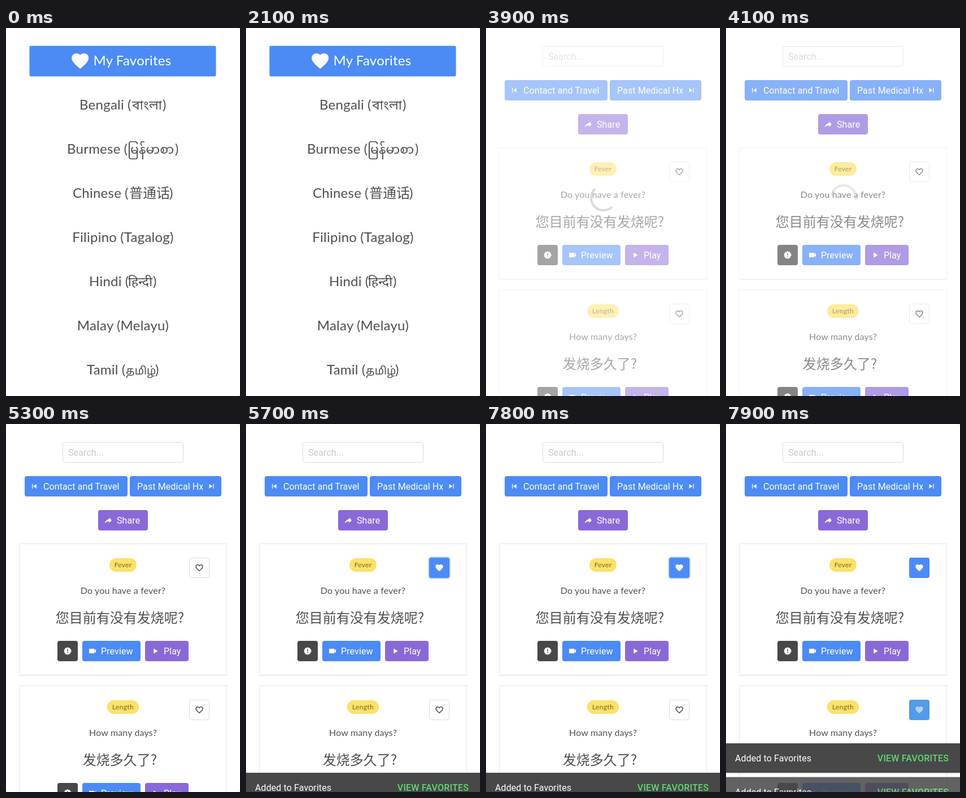
These frames come from a looping animation (414x650 px, 8 s). An HTML page:

```html
<!DOCTYPE html>
<html lang="zh-CN">
<head>
<meta charset="utf-8">
<title>Phrasebook</title>
<style>
html, body { margin: 0; width: 100%; height: 100%; overflow: hidden; background: #fff; }
svg { display: block; width: 414px; height: 650px; }
text { fill: #4f4f4f; white-space: pre; }
.list { font: 400 24px Lato, 'Noto Sans CJK SC', 'Noto Sans CJK', sans-serif; letter-spacing: .25px; word-spacing: -.4px; }
.title { font: 700 32px Lato, sans-serif; letter-spacing: .6px; fill: #444; }
.script { font-family: 'Noto Sans Bengali', 'Noto Sans Myanmar', 'Noto Sans Devanagari', 'Noto Sans Tamil', 'Noto Sans CJK SC', 'Noto Sans CJK', 'Noto Sans', sans-serif; }
.ask { font: 400 16px Lato, sans-serif; letter-spacing: .15px; }
.tag { font: 400 12px Lato, sans-serif; letter-spacing: .3px; }
.han { font: 400 24px 'Noto Sans CJK SC', 'Noto Sans CJK', sans-serif; }
.ui { font: 400 16px Roboto, sans-serif; letter-spacing: .1px; }
.act { font: 500 16px Roboto, sans-serif; letter-spacing: .2px; }
.mid { text-anchor: middle; }
.end { text-anchor: end; }
</style>
</head>
<body>
<svg id="stage" viewBox="0 0 414 650" xmlns="http://www.w3.org/2000/svg"></svg>
<script>
const LOOP = 8000, BLUE = '#4c8bf5', PURPLE = '#8969d8', DARK = '#484848';
const CATEGORIES = 2400, PHRASES = 3900, FADE = 4050, TAP1 = 5330, TAP2 = 7830;
const SNACK_H = 52, SNACK_Y = 616;

const HEART = 'M12 21.35l-1.45-1.32C5.4 15.36 2 12.27 2 8.5 2 5.41 4.42 3 7.5 3c1.74 0 3.41.81 4.5 2.08C13.09 3.81 14.76 3 16.5 3 19.58 3 22 5.41 22 8.5c0 3.77-3.4 6.86-8.55 11.53z';
const ICONS = {
  heart: HEART,
  outline: HEART + 'M12 18.65C7.14 14.24 4 11.39 4 8.5 4 6.5 5.5 5 7.5 5c1.54 0 3.04 1 3.57 2.36h1.86C13.46 6 14.96 5 16.5 5c2 0 3.5 1.5 3.5 3.5 0 2.89-3.14 5.74-8 10.15z',
  prev: 'M6 18V6h2v12zM9.5 12L18 6v12z',
  next: 'M16 18V6h2v12zM6 18V6l8.5 6z',
  share: 'M21 12l-7-7v4C7 10 4 15 3 20c2.5-3.5 6-5.1 11-5.1V19z',
  video: 'M17 10.5V7a1 1 0 0 0-1-1H4a1 1 0 0 0-1 1v10a1 1 0 0 0 1 1h12a1 1 0 0 0 1-1v-3.5l4 4v-11z',
  play: 'M8 5.1v14l11-7z'
};

const text = (x, y, s, cls, extra = '') => `<text x="${x}" y="${y}" class="${cls}" ${extra}>${s}</text>`;
const white = 'style="fill:#fff"';
const box = (x, y, w, h, r, fill, extra = '') =>
  `<rect x="${x}" y="${y}" width="${w}" height="${h}" rx="${r}" fill="${fill}" ${extra}/>`;
const frame = (x, y, w, h, r, stroke) =>
  box(x + .5, y + .5, w - 1, h - 1, r, '#fff', `stroke="${stroke}"`);
const icon = (name, cx, cy, size = 16, fill = '#fff') =>
  `<path d="${ICONS[name]}" fill="${fill}" fill-rule="evenodd" transform="translate(${cx - size / 2} ${cy - size / 2}) scale(${size / 24})"/>`;
const button = (x, y, w, fill, name, ix, label, tx) =>
  box(x, y, w, 36, 4, fill) + icon(name, ix, y + 18) + text(tx, y + 24, label, 'ui', white);
const group = (id, body) => `<g id="${id}">${body}</g>`;

const favorites = y => box(41.5, y - .5, 330, 54, 3, BLUE) +
  icon('heart', 131.2, y + 26.2, 36) + text(154.5, y + 34, 'My Favorites', 'list', white);

// Latin part, its x, native name, its x and size, x of the closing bracket
const languages = [
  ['Bengali (', 130, 'বাংলা', 223, 23, 277],
  ['Burmese (', 108, 'မြန်မာစာ', 215, 22, 299],
  ['Chinese (', 118, '普通话', 218, 24, 289],
  ['Filipino (Tagalog)'],
  ['Hindi (', 147, 'हिन्दी', 216, 23, 260],
  ['Malay (Melayu)'],
  ['Tamil (', 143, 'தமிழ்', 212, 19, 264]
];
const languageRow = ([name, x, native, nx, size, close], i) => {
  const y = 144 + i * 78;
  if (!native) return text(207, y, name, 'list mid');
  return text(x, y, name, 'list') +
    text(nx, y, native, 'script', `style="font-size:${size}px"`) + text(close, y, ')', 'list');
};

const categories = ['All Categories', 'Introduction', 'Contact and Travel', 'Symptoms', 'Past Medical Hx', 'Physical Exam'];

function card(n, dy, tag, tagX, tagW, question, han) {
  return `<g transform="translate(0 ${dy})">` +
    box(23, 212, 368, 233, 0, '#000', 'opacity=".07"') + frame(23, 211, 368, 233, 0, '#e6e6e6') +
    box(tagX, 237, tagW, 24, 12, '#fde168') +
    text(207, 253, tag, 'tag mid', 'style="fill:#6f632e"') +
    group('off' + n, frame(324, 236, 36, 36, 4, '#dbdbdb') + icon('outline', 342, 254, 16, '#363636')) +
    group('on' + n,
      box(323, 235, 38, 38, 5, 'none', `id="ring${n}" stroke="${BLUE}" stroke-width="2" stroke-opacity=".3"`) +
      box(324, 236, 36, 36, 4, BLUE, `id="fill${n}"`) +
      `<g id="mark${n}">${icon('heart', 342, 254)}</g>`) +
    text(207, 300, question, 'ask mid') +
    text(201.5, 351, han, 'han mid') +
    box(91, 383, 36, 36, 4, DARK) +
    '<circle cx="109" cy="401" r="6" fill="#fff"/><circle cx="109" cy="401" r="6" fill="none" stroke="#fff" stroke-width="1.4" stroke-dasharray="1.9 1.87"/>' +
    box(108.3, 397.3, 1.4, 4.4, 0, DARK) + box(108.3, 403, 1.4, 1.5, 0, DARK) +
    button(135, 383, 103, BLUE, 'video', 153, 'Preview', 168) +
    button(246, 383, 77, PURPLE, 'play', 264, 'Play', 279) + '</g>';
}

const snack = id => group(id,
  box(0, 1, 414, SNACK_H + 1, 0, '#000', 'opacity=".1"') + box(0, 0, 414, SNACK_H, 0, '#484848') +
  text(16, 32, 'Added to Favorites', 'ui', white) +
  text(394, 32, 'VIEW FAVORITES', 'act end', 'style="fill:#5fd774"'));

const arc = '<path d="M15.56 15.56A22 22 0 0 1 -15.56 -15.56" fill="none" stroke="#dbdbdb" stroke-width="4"/>';

document.getElementById('stage').innerHTML =
  box(0, 0, 414, 650, 0, '#aaa') + box(0, 0, 414, 650, 2, '#fff') +
  group('languages', favorites(32) + languages.map(languageRow).join('')) +
  group('categories', text(207, 60, 'Chinese', 'title mid') + favorites(92) +
    categories.map((s, i) => text(207, 204 + i * 78, s, 'list mid')).join('')) +
  group('phrases',
    frame(100, 32, 214, 36, 3, '#dbdbdb') +
    text(110, 56, 'Search...', 'ui', 'style="fill:#c8c8c8"') +
    button(33, 92, 182, BLUE, 'prev', 50, 'Contact and Travel', 66) +
    button(219, 92, 162, BLUE, 'next', 363.5, 'Past Medical Hx', 232) +
    button(163, 152, 88, PURPLE, 'share', 181, 'Share', 196) +
    card(1, 0, 'Fever', 183, 48, 'Do you have a fever?', '您目前有没有发烧呢?') +
    card(2, 251, 'Length', 179, 56, 'How many days?', '发烧多久了?')) +
  group('loading', box(0, 0, 414, 650, 0, '#fff', 'opacity=".5"') + group('spinner', arc)) +
  snack('snack1') + snack('snack2');

const $ = id => document.getElementById(id);
const clamp = v => Math.max(0, Math.min(1, v));
const show = (id, on) => $(id).setAttribute('display', on ? 'inline' : 'none');

function heart(n, t, tap, blur) {
  const on = t >= tap, fresh = t < tap + 100;
  show('off' + n, !on);
  show('on' + n, on);
  show('ring' + n, !fresh && t < blur);
  $('fill' + n).setAttribute('fill', fresh ? '#529be6' : BLUE);
  $('mark' + n).setAttribute('opacity', fresh ? .55 : 1);
}

function slide(id, t, start, lift) {
  const e = 1 - (1 - clamp((t - start) / 150)) ** 3;
  show(id, t >= start);
  $(id).setAttribute('opacity', e);
  $(id).setAttribute('transform', `translate(0 ${SNACK_Y - lift + SNACK_H * (1 - e)})`);
}

function draw(t) {
  show('languages', t < CATEGORIES);
  show('categories', t >= CATEGORIES && t < PHRASES);
  show('phrases', t >= PHRASES);

  const fade = 1 - clamp((t - FADE) / 150);
  show('loading', t >= PHRASES && fade > 0);
  $('loading').setAttribute('opacity', fade);
  $('spinner').setAttribute('transform', `translate(208 300) rotate(${145 + (t - 4100) * .72})`);

  heart(1, t, TAP1, TAP2);
  heart(2, t, TAP2, LOOP);
  slide('snack1', t, TAP1, t >= TAP2 ? SNACK_H : 0);
  slide('snack2', t, TAP2, 0);
}

const begin = performance.now();
function tick() {
  draw((performance.now() - begin) % LOOP);
  requestAnimationFrame(tick);
}
tick();
</script>
</body>
</html>
```
